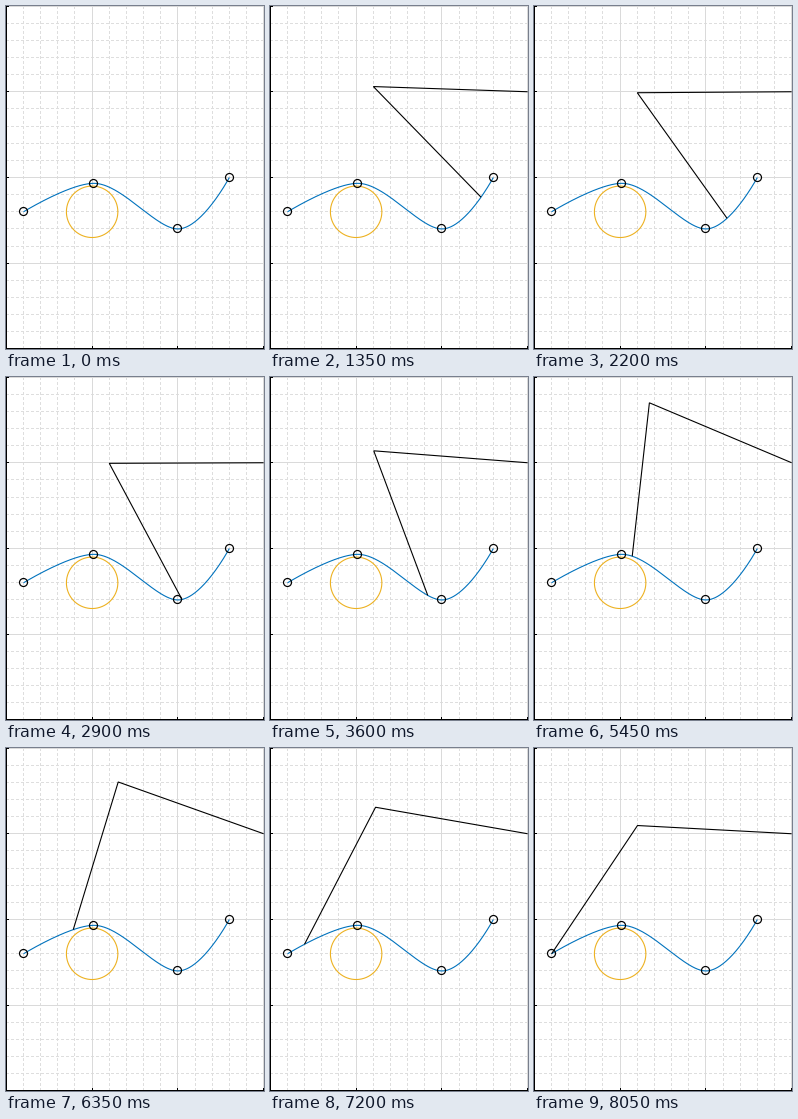
Write a matplotlib script that moves like this. It is 258 px wide and 343 px high and loops after 8100 ms.

```python
import numpy as np
import matplotlib.pyplot as plt
from matplotlib.animation import FuncAnimation

W, H, DPI = 258, 343, 100
PX = 72 / DPI            # one pixel in points
UNIT = H / 4             # pixels per world unit
LINK = 1.8
BASE = np.array([3.0, 3.0])
OBSTACLE, RADIUS = (1.0, 1.6), 0.3
WAY = np.array([[2.6, 2.0], [2.0, 1.4], [1.02, 1.932], [0.2, 1.6]])
KNOTS = np.array([0.0, 59.4, 113.6, 160.0])
STEPS, IDLE = 160, 2


def px(x, y):
    """World units to pixel coordinates, y pointing down."""
    return (W / 2 + UNIT * (np.asarray(x) - 1.5),
            H / 2 + UNIT * (2 - np.asarray(y)))


def knot_speeds():
    """Mean of neighbouring slopes, zero at the ends and at turning points."""
    slope = np.diff(WAY, axis=0) / np.diff(KNOTS)[:, None]
    a, b = slope[:-1], slope[1:]
    v = np.zeros_like(WAY)
    v[1:-1] = np.where(a * b > 0, (a + b) / 2, 0)
    return v


SPEED = knot_speeds()


def tip(t):
    """Position on the piecewise cubic path at time t."""
    t = np.atleast_1d(t)
    k = np.clip(np.searchsorted(KNOTS, t, side="right") - 1, 0, len(KNOTS) - 2)
    h = (KNOTS[k + 1] - KNOTS[k])[:, None]
    u = (t - KNOTS[k])[:, None] / h
    rise = u * u * (3 - 2 * u)
    return (WAY[k] * (1 - rise) + WAY[k + 1] * rise
            + h * SPEED[k] * u * (1 - u) ** 2
            + h * SPEED[k + 1] * u * u * (u - 1))


def arm_points(t):
    """Base, elbow and tip of the two-link arm."""
    end = tip(t)[0]
    d = end - BASE
    dist = np.hypot(*d)
    side = np.array([d[1], -d[0]]) / dist
    elbow = (BASE + end) / 2 + side * np.sqrt(LINK ** 2 - dist ** 2 / 4)
    return np.array([BASE, elbow, end])


fig = plt.figure(figsize=(W / DPI, H / DPI), dpi=DPI, facecolor="white")
ax = fig.add_axes([0, 0, 1, 1])
ax.set_xlim(0, W)
ax.set_ylim(H, 0)
ax.axis("off")


def line(x, y, color, width=1, **kw):
    return ax.plot(x, y, color=color, lw=width * PX, solid_capstyle="butt",
                   solid_joinstyle="miter", snap=False, **kw)[0]


def rows_cols(step):
    """Pixel-centred grid positions for a spacing in world units."""
    x, y = px(step * np.arange(round(3 / step) + 1),
              step * np.arange(round(4 / step) + 1))
    return (np.clip(np.rint(x - 0.5) + 0.5, 0.5, W - 0.5),
            np.clip(np.rint(y - 0.5) + 0.5, 0.5, H - 0.5))


def grid(cols, rows, color, **kw):
    for c in cols:
        line([c, c], [H, 0], color, **kw)
    for r in rows:
        line([0, W], [r, r], color, **kw)


major_x, major_y = rows_cols(1)
minor_x, minor_y = rows_cols(0.2)
grid(np.setdiff1d(minor_x, major_x), np.setdiff1d(minor_y, major_y),
     "#dedede", dashes=(3, 2))
grid(major_x, major_y, "#dadada")

# axis lines and inward ticks
line([0.5, 0.5], [0, H], "black")
line([0, W], [H - 0.5, H - 0.5], "black")
for c in major_x:
    line([c, c], [H - 3, H], "black")
for r in major_y:
    line([0, 3], [r, r], "black")

path = tip(np.linspace(0, KNOTS[-1], 400))
line(*px(*path.T), "#0072bd", 1.1)

a = np.linspace(0, 2 * np.pi, 200)
line(*px(OBSTACLE[0] + RADIUS * np.cos(a), OBSTACLE[1] + RADIUS * np.sin(a)),
     "#edb120", 1.1)

# markers sit on whole pixels
ax.plot(*np.floor(px(*WAY.T)), "o", ms=8 * PX, mfc="none", mec="black",
        mew=1.2 * PX, ls="none", snap=False)
arm = line([], [], "black", 1.1)


def update(i):
    if i < IDLE:
        arm.set_data([], [])
    else:
        arm.set_data(*px(*arm_points(i - IDLE).T))
    return arm,


anim = FuncAnimation(fig, update, frames=STEPS + IDLE, interval=50,
                     repeat=True, repeat_delay=0)
plt.show()
```
